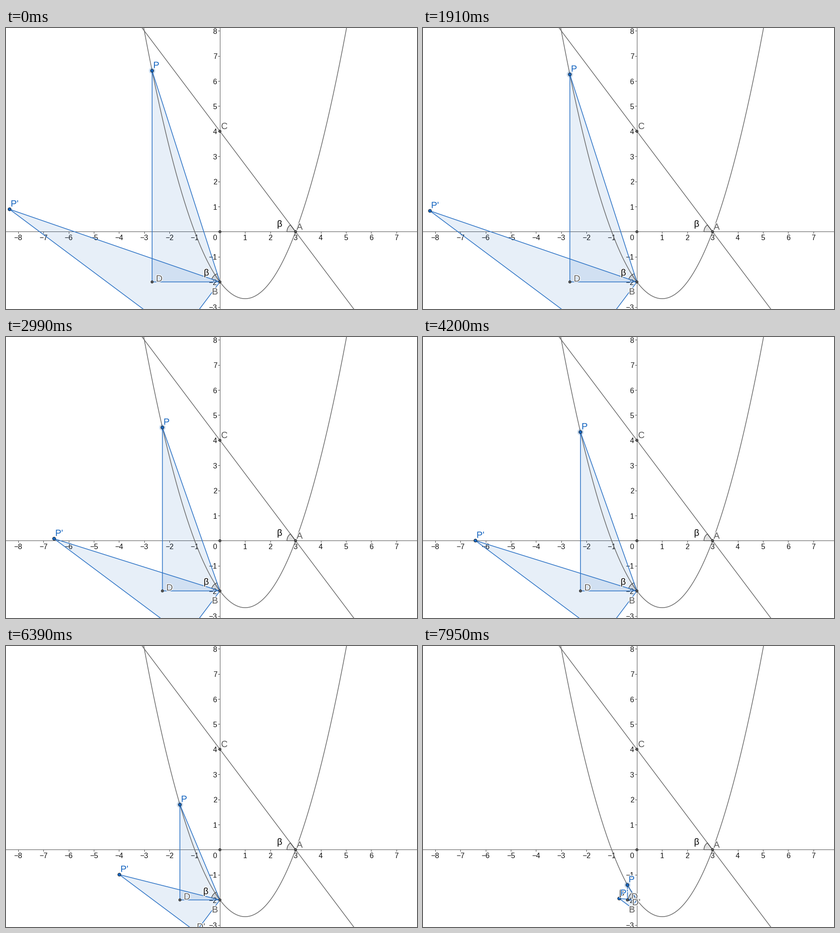
Write a matplotlib script that moves like this. It is 903 px wide and 620 px high and loops after 8000 ms.

```python
import numpy as np
import matplotlib.pyplot as plt
from matplotlib.animation import FuncAnimation
from matplotlib.patches import Circle, Polygon, Wedge
from matplotlib.patheffects import withStroke

W, H, DPI = 903, 620, 100
FRAME_MS, LOOP_MS = 40, 8000
PT = 72 / DPI                      # points per pixel
X0, Y0, UNIT = 470, 449.5, 55.4    # origin and scale of the plane
GRAY, DARK, BLUE, EDGE = "#6e6e6e", "#5a5a5a", "#1565c0", "#2e74c6"
TURN = 0.6 + 0.8j                  # rotation by beta, tan(beta) = 4/3
B = -2j

plt.rcParams["font.family"] = "Liberation Sans"
# The small surplus keeps the pixel size from rounding down.
fig = plt.figure(figsize=((W + 0.01) / DPI, (H + 0.01) / DPI), dpi=DPI,
                 facecolor="white")
ax = fig.add_axes([0, 0, 1, 1])
ax.set_xlim(0, W)
ax.set_ylim(H, 0)
ax.axis("off")


def px(z):
    """Screen position of a point given as a complex number."""
    return X0 + UNIT * z.real, Y0 - UNIT * z.imag


def height(x):
    return 2 / 3 * (x + 1) * (x - 3)


def line(xs, ys, color=GRAY, width=1.6, z=3):
    return ax.plot(xs, ys, color=color, lw=width * PT, zorder=z)[0]


def dot(z, color=DARK, radius=2.7):
    patch = Circle(px(z), radius, fc=color, ec="#1c1c1c", lw=0.9 * PT, zorder=6)
    return ax.add_patch(patch)


def label(text, color=DARK, z=8.0, at=(0, 0)):
    halo = [withStroke(linewidth=3 * PT, foreground="white")]
    return ax.text(*at, text, color=color, size=20 * PT, va="baseline",
                   zorder=z, path_effects=halo)


def sector(center, start, stop):
    return ax.add_patch(Wedge(center, 19, start, stop, fc=(0, 0, 0, 0.11),
                              ec="#404040", lw=1.3 * PT, zorder=4))


def triangle():
    fill = ax.add_patch(Polygon(np.zeros((3, 2)), fc=BLUE, alpha=0.1, lw=0, zorder=2))
    edge = ax.add_patch(Polygon(np.zeros((3, 2)), fill=False, ec=EDGE,
                                lw=1.6 * PT, joinstyle="round", zorder=5))
    return fill, edge


def draw_axes():
    line([0, W], [Y0, Y0], "#4a4a4a", 1, 1)
    line([X0 - 0.4] * 2, [0, H], "#4a4a4a", 1, 1)
    style = dict(size=16 * PT, color="#111111", zorder=1, va="baseline")
    for n in range(-8, 9):
        text = str(n).replace("-", "\u2212")
        x, y = px(complex(n, n))
        if n and n < 8:
            line([x, x], [Y0, Y0 + 3.5], "#4a4a4a", 1, 1)
            ax.text(x, 467.5, text, ha="center", **style)
        if n and n >= -3:
            line([X0 - 4, X0], [y, y], "#4a4a4a", 1, 1)
            ax.text(463.5, y + 6.5, text, ha="right", **style)
    ax.text(459, 467.5, "0", ha="center", **style)


def draw_fixed():
    xs = np.linspace(-3.2, 5.3, 400)
    line(*px(xs + 1j * height(xs)))
    ends = np.array([-4.0, 6.0])
    line(*px(ends + 1j * (4 - 4 / 3 * ends)))
    for z in (0j, 3 + 0j, 4j, B):
        dot(z)
    sector(px(3 + 0j), 180, 180 + np.degrees(np.angle(TURN)))
    label("β", "black", at=(595.5, 438.5))
    label("A", at=(638.5, 445))
    label("B", at=(452.5, 588), z=8.6)
    label("C", at=(472.5, 223))


draw_axes()
draw_fixed()
shape, shape_turned = triangle(), triangle()
angle_b = sector(px(B), 0, 1)
ring = ax.add_patch(Circle((0, 0), 7, fc=BLUE, alpha=0.22, lw=0, zorder=5.5))
p_dot, q_dot = dot(0j, BLUE, 3.5), dot(0j, BLUE, 3.5)
d_dot, e_dot = dot(0j), dot(0j)
beta_text = label("β", "black", 8.1)
p_text, q_text = label("P", BLUE, 8.3), label("P'", BLUE, 8.2)
d_text, e_text = label("D", z=8.4), label("D'", z=8.5)

# The dragged point moves in small steps; bursts are (first, last, count).
BURSTS = [(370, 1070, 7), (1180, 1180, 1), (1320, 2020, 7), (2140, 2870, 7),
          (2990, 3350, 4), (5540, 6280, 7), (6390, 7120, 7), (7250, 7950, 7)]
STEPS = np.concatenate([[0]] + [np.linspace(*b).round(-1) for b in BURSTS])
PATH = np.array([
    (255, -2.690), (1070, -2.975), (1180, -2.989), (1320, -2.965),
    (1910, -2.655), (2020, -2.576), (2870, -2.317), (2990, -2.281),
    (3350, -2.239), (5420, -2.239), (5540, -2.231), (5910, -2.07),
    (6280, -1.761), (6390, -1.587), (7120, -0.924), (7950, -0.376)])


def drag_x(t):
    step = STEPS[np.searchsorted(STEPS, t, side="right") - 1]
    return np.interp(step, PATH[:, 0], PATH[:, 1])


def place(dot_patch, text, z, dx, dy):
    x, y = px(z)
    dot_patch.center = x, y
    text.set_position((x + dx, y + dy))


def update(frame):
    x = drag_x(frame * FRAME_MS + 30)
    p, d = complex(x, height(x)), complex(x, -2)
    q, e = (B + (z - B) * TURN for z in (p, d))

    for parts, corners in ((shape, (p, d, B)), (shape_turned, (q, e, B))):
        for part in parts:
            part.set_xy([px(z) for z in corners])

    place(p_dot, p_text, p, 2.5, -6)
    place(q_dot, q_text, q, 2.5, -6)
    place(d_dot, d_text, d, 8.5, -1)
    place(e_dot, e_text, e, 2, -5)
    ring.center = px(p)

    # The y axis points down, so wedge angles are mirrored.
    first, last = np.angle(p - B), np.angle(p - B) + np.angle(TURN)
    angle_b.set_theta1(-np.degrees(last))
    angle_b.set_theta2(-np.degrees(first))
    bx, by = px(B)
    middle = (first + last) / 2
    beta_text.set_position((bx - 20 + 22 * np.cos(middle),
                            by + 1.5 - 22 * np.sin(middle)))
    return []


anim = FuncAnimation(fig, update, frames=LOOP_MS // FRAME_MS, interval=FRAME_MS,
                     repeat=True, repeat_delay=0)
plt.show()
```
